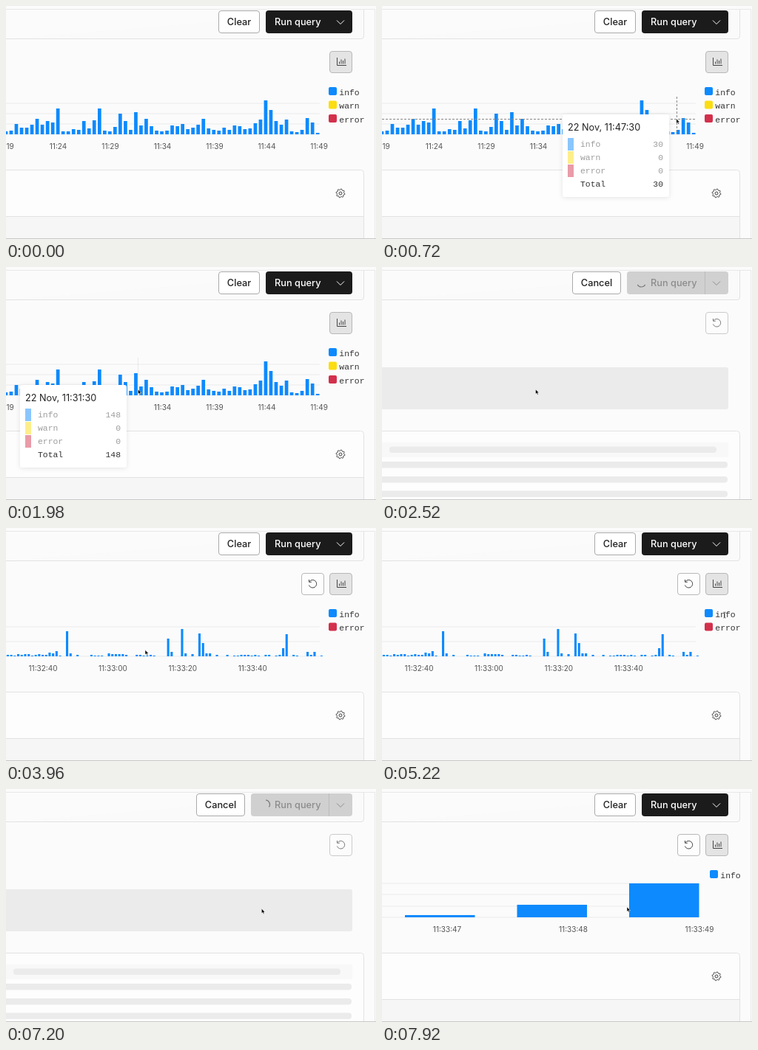
Recreate the animation shown at these times as an HTML page. Size 500x316 px, loop 8 s.

```html
<!DOCTYPE html>
<html lang="en">
<head>
<meta charset="utf-8">
<title>Log histogram zoom</title>
<style>
  html, body { margin: 0; width: 100%; height: 100%; overflow: hidden; background: #fbfbfb; }
  svg { display: block; }
  text { font: 10px Inter, sans-serif; fill: #555; }
  .btn { font-size: 12.75px; font-weight: 500; fill: #222; }
  .title { font-size: 12.7px; fill: #222; }
  .mono { font: 11.4px "Liberation Mono", monospace; fill: #333; }
  .line { fill: none; stroke: #444; stroke-width: 1; }
  .mid { text-anchor: middle; }
  .end { text-anchor: end; }
</style>
</head>
<body>
<svg id="stage" width="500" height="316" viewBox="0 0 500 316"></svg>
<script>
const LOOP = 8000, BASE = 174;
const COLORS = { info: '#0d8afd', warn: '#fbdd10', error: '#d3304c' };
const stage = document.getElementById('stage');

const rect = (x, y, w, h, fill, extra = '') =>
  `<rect x="${x}" y="${y}" width="${w}" height="${h}" fill="${fill}" ${extra}/>`;
const text = (x, y, s, cls = '', extra = '') => `<text x="${x}" y="${y}" class="${cls}" ${extra}>${s}</text>`;
const path = (d, extra = '') => `<path d="${d}" class="line" ${extra}/>`;
const group = (id, body, extra = '') => `<g id="${id}" ${extra}>${body}</g>`;
const button = (x, y, w, h, fill, stroke) => rect(x + .5, y + .5, w - 1, h - 1, fill, `rx="3.5" stroke="${stroke}"`);

// Bar heights per step; x is the left edge of the first bar
const charts = [
  { x: -2.4, step: 7.02, width: 4.7, start: 11 * 3600 + 19 * 60, unit: 30, scale: 4.92,
    grid: [132, 146, 160], levels: ['info', 'warn', 'error'], legendX: 436,
    labels: [19, 24, 29, 34, 39, 44, 49].map((m, i) => [i * 70.5, '11:' + m]),
    bars: [4, 5, 14, 9, 9, 13, 21, 13, 18, 16, 35, 4, 4, 7, 6, 18, 8, 19, 35, 5, 4, 10, 28, 18, 6, 30, 12, 21, 11, 5,
      4, 5, 12, 11, 14, 7, 9, 13, 21, 8, 6, 5, 9, 6, 12, 11, 7, 8, 15, 20, 46, 33, 18, 13, 20, 4, 3, 6, 22, 16, 2] },
  { x: .9, step: 4.71, width: 3.1, start: 11 * 3600 + 32 * 60 + 30, unit: 1, scale: 1,
    grid: [134, 154], levels: ['info', 'error'], legendX: 436,
    labels: ['32:40', '33:00', '33:20', '33:40'].map((s, i) => [50 + i * 94.4, '11:' + s]),
    bars: [...'2213233123225471', 0, 34, ...'4020002111043333200221121000', 24, 6, 0, 0, 37, 4, 0, 3, 0, 31, 18,
      ...'440200201122212102201', 2, 11, 30, ...'02100626010'].map(Number) },
  { x: 31, step: 151.5, width: 94.5, grid: [128, 143, 159], levels: ['info'], legendX: 443,
    labels: [47, 48, 49].map((s, i) => [88 + i * 170.5, '11:33:' + s]), bars: [3, 17, 46] }
];

const drawChart = (c, i) => group('chart' + i,
  [...c.grid, BASE].map(y => rect(0, y - .5, i == 2 ? 428 : 424, 1, '#ebebeb')).join('') +
  c.bars.map((h, k) => h ? rect((c.x + k * c.step).toFixed(1), BASE - h, c.width, h, COLORS.info) : '').join('') +
  c.labels.map(([x, s]) => text(x, 193.5, s, 'mid')).join('') +
  c.levels.map((name, k) => rect(c.legendX, 110 + k * 18.5, 11, 11, COLORS[name], 'rx="2"') +
    text(c.legendX + 14.3, 120.5 + k * 18.5, name, 'mono')).join(''));

const gear = Array.from({ length: 32 }, (_, i) => {
  const r = i % 4 < 2 ? 6 : 4.6, a = (i + .5) * Math.PI / 16;
  return (452 + r * Math.cos(a)).toFixed(1) + ' ' + (254 + r * Math.sin(a)).toFixed(1);
}).join('L');

const bars = rows => rows.map(y => rect(-9, y, 476, 8.5, '#ebebeb', 'rx="4"')).join('');

stage.innerHTML =
  rect(0, 0, 500, 316, '#fbfbfb') +
  path('M0 4.5H499M498.5 5V315', 'style="stroke:#e8e8e8"') +
  path('M0 44.5H480Q483.5 44.5 483.5 41V5', 'style="stroke:#e2e2e2;fill:#fafafa"') +
  rect(-10, 222.5, 493.5, 110, '#fdfdfd', 'rx="4" stroke="#e2e2e2"') +
  group('ready',
    button(287, 6, 56, 31, '#fff', '#aaa') + text(315, 25.5, 'Clear', 'btn mid') +
    rect(351, 6, 117, 31, '#1b1b1b', 'rx="4"') +
    text(363, 25.5, 'Run query', 'btn', 'style="fill:#fff"') +
    path('M447 19.5l5 5 5-5', 'style="stroke:#fff"') +
    button(437, 61, 31, 30, '#e4e4e4', '#b8b8b8') +
    path('M447.5 70V80.5H460M450.5 78.5v-3M453 78.5v-6M455.5 78.5v-4.500M458 78.5v-7') +
    rect(0, 286, 483, 30, '#f6f6f6') + path('M0 285.5H483', 'style="stroke:#e2e2e2"') +
    path('M' + gear + 'Z') + '<circle cx="452" cy="254" r="2" class="line"/>') +
  group('loading',
    button(257, 6, 66, 31, '#fff', '#aaa') + text(290, 25.5, 'Cancel', 'btn mid') +
    rect(331, 6, 137, 31, '#d0d0d0', 'rx="4"') + path('M436.5 6V37', 'style="stroke:#bcbcbc"') +
    text(363, 25.5, 'Run query', 'btn', 'style="fill:#8c8c8c"') +
    path('M447 19.5l5 5 5-5', 'style="stroke:#8c8c8c"') +
    path('M5.2 3A6 6 0 0 1-5.2 3', 'id="spinner" style="stroke:#777;stroke-width:1.2"') +
    rect(-5, 136, 473, 57, '#ebebeb', 'rx="3"') +
    rect(-5, 238, 473, 20, '#f8f8f8') + rect(10, 243.5, 442, 8.5, '#ebebeb', 'rx="4"') +
    bars([264, 284, 303.5])) +
  group('undo', button(399, 61, 31, 30, '#fdfdfd', '#b8b8b8') +
    path('M410.200 72.5A5.300 5.300 0 1 1 409.400 77.500M409.5 70v3.300h3.300')) +
  charts.map(drawChart).join('') +
  group('cross', path('', 'id="crossLines" style="stroke:#888;stroke-dasharray:3 2"')) +
  rect(0, 123, 0, 51, 'rgba(90,90,90,.25)', 'id="selection"') +
  group('tip', '') +
  path('M0 315.500H500', 'style="stroke:#c8c8c8"') +
  group('arrow', '<path d="M0 0V6.300L1.500 5 2.600 7.300 3.700 6.800 2.700 4.600H4.600Z" fill="#000" stroke="#fff" stroke-width=".5"/>') +
  group('beam', path('M-1.500-4Q0-4 0-3Q0-4 1.500-4M0-3V3M-1.500 4Q0 4 0 3Q0 4 1.500 4', 'style="stroke-width:.8"'));

const el = {};
stage.querySelectorAll('[id]').forEach(n => el[n.id] = n);
const show = (id, on) => el[id].style.display = on ? '' : 'none';
const set = (id, name, value) => el[id].setAttribute(name, value);
const move = (id, x, y) => set(id, 'transform', `translate(${x} ${y})`);

// Pointer path: time, x, y
const route = [[500, 430, 150], [1300, 257.5, 165.5], [1500, 257.5, 165.5], [1880, 178, 166], [1960, 178, 166],
  [2280, 207.5, 166], [3000, 207.5, 166], [3700, 188, 165.5], [4500, 188, 165.5], [5100, 463, 118],
  [5450, 463, 118], [5840, 350, 167.5], [5920, 350, 167.5], [6260, 380.5, 168], [6660, 380.5, 168],
  [7500, 331, 160], [8000, 331, 160]];

function pointer(t) {
  const i = route.findIndex(p => p[0] > t);
  if (i < 1) return null;
  const [a, b] = [route[i - 1], route[i]];
  const u = (t - a[0]) / (b[0] - a[0]), e = u * u * (3 - 2 * u);
  return { x: a[1] + (b[1] - a[1]) * e, y: a[2] + (b[2] - a[2]) * e };
}

const clock = s => [s / 3600, s / 60 % 60, s % 60].map(n => String(Math.floor(n)).padStart(2, '0')).join(':');

function tipBody(c, k) {
  const count = Math.round(c.bars[k] * c.scale), n = c.levels.length;
  const row = (i, name, value) => text(24, 44 + i * 18, name, 'mono') + text(136, 44 + i * 18, value, 'mono end');
  return rect(0, 0, 144, 58 + n * 18, '#fff', 'rx="3" style="filter:drop-shadow(0 1px 3px rgba(0,0,0,.1))"') +
    text(7, 21.5, '22 Nov, ' + clock(c.start + k * c.unit), 'title') +
    group('rows', c.levels.map((name, i) => rect(7, 32 + i * 18, 8, 17, COLORS[name]) +
      row(i, name, i ? 0 : count)).join(''), 'opacity=".48"') +
    row(n, 'Total', count);
}

function render(t) {
  const view = t < 2340 ? 0 : t < 6480 ? 1 : 2;
  const loading = t >= 2340 && t < 3600 || t >= 6480 && t < 7740;
  const chart = charts[view], p = pointer(t);
  show('ready', !loading);
  show('loading', loading);
  show('undo', loading || view);
  move('undo', loading ? 38 : 0, 0);
  set('undo', 'opacity', loading ? .7 : 1);
  set('spinner', 'transform', `translate(350.5 21) rotate(${(t - 2520) * .36})`);
  charts.forEach((_, i) => show('chart' + i, !loading && i == view));

  const onLegend = p && !loading && p.x > 449 && p.y < 124;
  show('arrow', p && !onLegend);
  show('beam', onLegend);
  if (p) { move('arrow', p.x, p.y); move('beam', p.x, p.y); }

  const drag = !loading && (t >= 1920 && t < 2340 ? 178 : t >= 5880 && t < 6480 ? 350 : 0);
  const hover = p && !loading && (view == 0 || view == 1 && t > 4500) && p.y > 123 && p.x < 424;
  show('selection', drag);
  show('cross', hover && !drag);
  show('tip', hover);
  if (drag) {
    set('selection', 'x', drag);
    set('selection', 'width', Math.max(0, p.x - drag));
  }
  if (!hover) return;
  const x = drag || p.x;
  const k = Math.min(chart.bars.length - 1, Math.round((x - chart.x - chart.width / 2) / chart.step));
  const cx = Math.round(chart.x + k * chart.step) + .5;
  const y = Math.round(p.y) + .5;
  set('crossLines', 'd', `M${cx} 123V174M0 ${y}H424`);
  el.tip.innerHTML = tipBody(chart, k);
  move('tip', cx - 154.5, drag ? 160 : Math.round(p.y - 6));
}

function tick(now) {
  render(now % LOOP);
  requestAnimationFrame(tick);
}
render(0);
requestAnimationFrame(tick);
</script>
</body>
</html>
```
